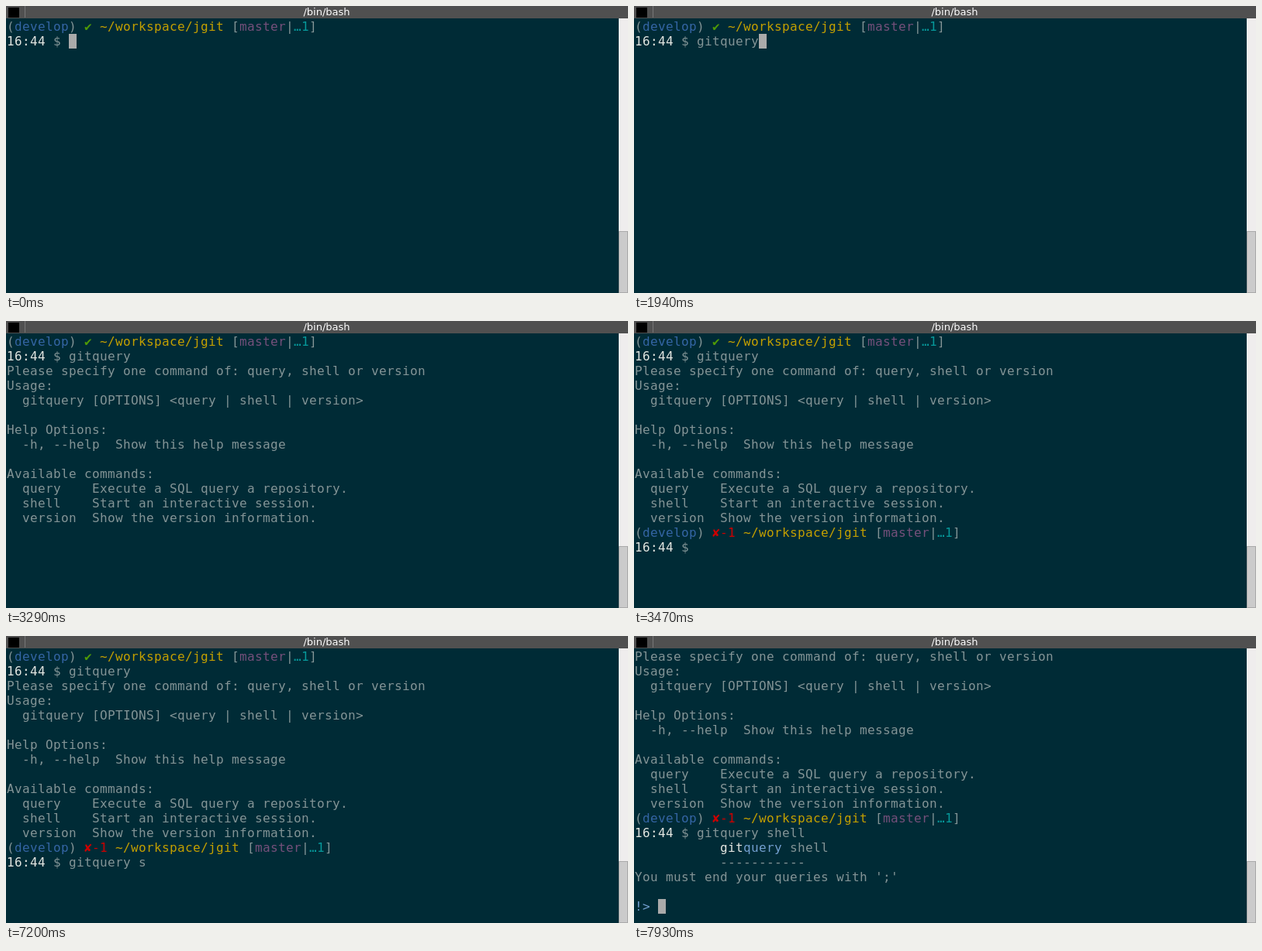
Recreate the animation shown at these times as an HTML page with a canvas. Size 802 by 371 pixels, loop 8 s.

```html
<!DOCTYPE html>
<html lang="en">
<head>
<meta charset="utf-8">
<title>Terminal</title>
<style>
  html, body { margin: 0; width: 100%; height: 100%; overflow: hidden; background: #002b36; }
  canvas { display: block; }
</style>
</head>
<body>
<canvas id="stage" width="802" height="371"></canvas>
<script>
const ctx = document.getElementById('stage').getContext('2d');
const LOOP = 8000;
const CELL_W = 10, CELL_H = 19, LEFT = 1, TOP = 17, ASCENT = 15;
const C = {
  back: '#002b36', text: '#839496', white: '#e4e6e1', cursor: '#aaaaaa',
  red: '#cc0000', green: '#4e9a06', yellow: '#c4a000', blue: '#3465a4',
  purple: '#75507b', cyan: '#06989a', sky: '#729fcf'
};

// Times at which each character appears
const FIRST_KEYS = [500, 550, 750, 1060, 1140, 1330, 1390, 1940];
const SHELL_KEYS = [7200, 7290, 7440, 7570, 7720];
const ENTER = 3190, HELP = 3290, PROMPT = 3470, RECALL = 5200, RUN = 7830, SHELL = 7930;

const HELP_TEXT = [
  'Please specify one command of: query, shell or version',
  'Usage:',
  '  gitquery [OPTIONS] <query | shell | version>',
  '',
  'Help Options:',
  '  -h, --help  Show this help message',
  '',
  'Available commands:',
  '  query    Execute a SQL query a repository.',
  '  shell    Start an interactive session.',
  '  version  Show the version information.'
];

const plain = text => [[text, C.text]];

const prompt = (mark, color) => [
  ['(', C.text], ['develop', C.blue], [') ', C.text], [mark, color],
  [' ~/workspace/jgit ', C.yellow], ['[', C.text], ['master', C.purple],
  ['|', C.text], ['…1', C.cyan], [']', C.text]
];

const command = text => [['16:44', C.white], [' $ ' + text, C.text]];

const typed = (text, keys, t) => text.slice(0, keys.filter(k => k <= t).length);

function screenAt(t) {
  const first = typed('gitquery', FIRST_KEYS, t);
  let lines = [prompt('✔', C.green), command(first)];
  let cursor = t < ENTER ? [8 + first.length, 1] : null;

  if (t >= HELP) lines.push(...HELP_TEXT.map(plain));
  if (t >= PROMPT) {
    const again = t < RECALL ? '' : 'gitquery ' + typed('shell', SHELL_KEYS, t);
    lines.push(prompt('✘-1', C.red), command(again));
  }
  if (t >= RUN) cursor = [0, 15];
  if (t >= SHELL) {
    lines = lines.slice(2).concat([
      [['           git', C.white], ['query', C.sky], [' shell', C.text]],
      plain('           -----------'),
      plain("You must end your queries with ';'"),
      [],
      [['!>', C.sky]]
    ]);
    cursor = [3, 17];
  }
  return { lines, cursor };
}

function rect(color, x, y, w, h) {
  ctx.fillStyle = color;
  ctx.fillRect(x, y, w, h);
}

function drawLine(parts, row) {
  let col = 0;
  for (const [text, color] of parts) {
    ctx.fillStyle = color;
    for (const ch of text) {
      if (ch !== ' ') ctx.fillText(ch, LEFT + col * CELL_W, TOP + row * CELL_H + ASCENT);
      col++;
    }
  }
}

function drawWindow() {
  rect(C.back, 0, 0, 802, 371);
  rect('#505050', 0, 0, 802, 16);
  rect('#000000', 3, 2, 14, 13);
  rect('#777777', 24, 0, 1, 15);
  ctx.font = '13px "DejaVu Sans", sans-serif';
  ctx.textAlign = 'center';
  ctx.fillStyle = '#ffffff';
  ctx.fillText('/bin/bash', 413.5, 12);

  rect('#efeded', 790, 16, 12, 355);
  rect('#a9a9a9', 790, 291, 12, 80);
  rect('#cbcbcb', 791, 292, 10, 78);
}

function draw(t) {
  drawWindow();
  const { lines, cursor } = screenAt(t);
  ctx.font = '16px "DejaVu Sans Mono", monospace';
  ctx.textAlign = 'left';
  lines.forEach(drawLine);
  if (cursor) {
    rect(C.cursor, LEFT + cursor[0] * CELL_W, TOP + cursor[1] * CELL_H, CELL_W, CELL_H);
  }
}

const start = performance.now();
function tick() {
  draw((performance.now() - start) % LOOP);
  requestAnimationFrame(tick);
}
tick();
</script>
</body>
</html>
```
